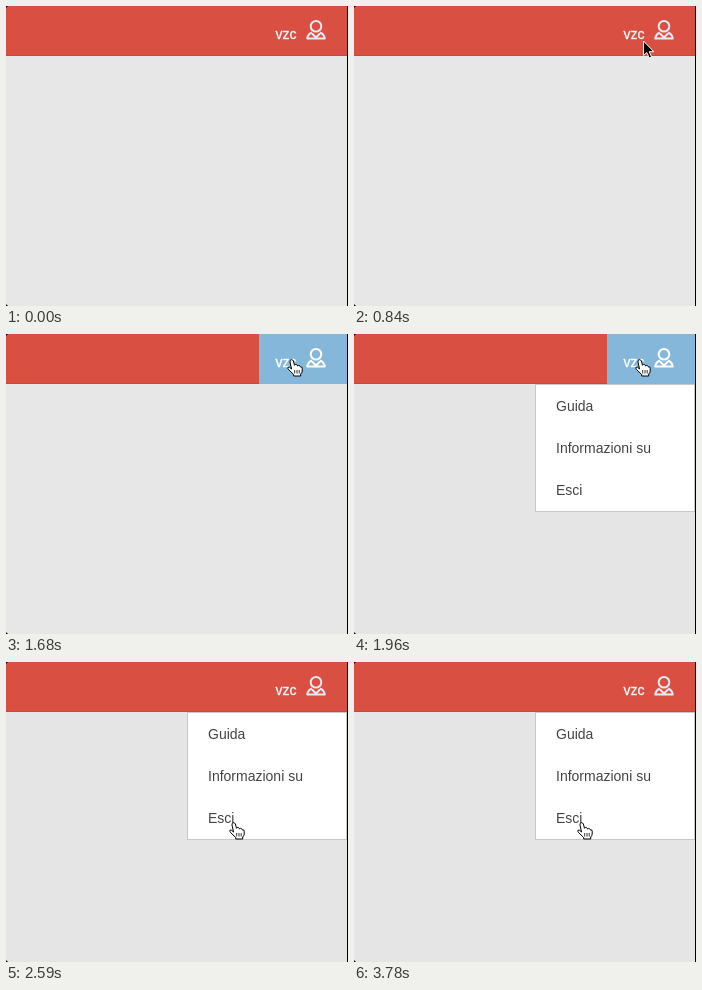
Recreate the animation shown at these times as an HTML page. Size 342x300 px, loop 3.85 s.

```html
<!DOCTYPE html>
<html lang="it">
<head>
<meta charset="utf-8">
<style>
  html, body { margin: 0; width: 100%; height: 100%; overflow: hidden; }
  svg { display: block; width: 342px; height: 300px; font: 14px "Liberation Sans", Arial, sans-serif; }
  #user { stroke-width: .35; }
  #icon { fill: none; stroke-width: 2; stroke-linejoin: round; }
  #menu text { fill: #444; }
  #arrow { fill: #000; stroke: #fff; }
  #hand { fill: #fff; stroke: #000; stroke-linejoin: round; }
</style>
</head>
<body>
<svg viewBox="0 0 342 300">
  <rect id="page" width="342" height="300"/>
  <rect width="342" height="50" fill="#d95043"/>
  <rect y="49" width="342" height="1" fill="#c4483c"/>
  <rect id="hover" x="253" width="88" height="50" fill="#84b7d9"/>
  <g id="account">
    <text id="user" x="269.5" y="33">vzc</text>
    <g id="icon">
      <circle cx="310" cy="20.3" r="5.3"/>
      <path d="M306 26.5Q302 28 301.2 32.5H318.8Q318 28 314 26.5M306 27.5L310 31.5L314 27.5"/>
    </g>
  </g>
  <g id="menu">
    <rect x="181.5" y="50.5" width="159" height="127" fill="#fff" stroke="#c8c8c8"/>
    <text x="202" y="77">Guida</text>
    <text x="202" y="119">Informazioni su</text>
    <text x="202" y="161">Esci</text>
  </g>
  <path d="M341 0h1v300h-1zM0 0h2l-2 2zM0 300v-2l2 2z"/>
  <g id="cursor">
    <path id="arrow" d="M.5 0V14.5L3.8 11.5L6.2 17L8.6 16L6.3 10.7H10.8Z"/>
    <g id="hand">
      <path d="M-.5 10L-2 3Q-2.2 1 -.8 .7T1.4 2L2.5 6.3Q3.2 5 4.3 5.5T5.6 7Q6.4 6 7.4 6.6T8.4 8Q10.2 7.3 10.2 9.2V12Q10 14 8.7 15V17H1.7V15.5L-3.2 10.8Q-4.8 9 -4 8.2Q-2.5 7.4 -.5 10Z"/>
      <path d="M2.7 11v3.5M5 11v3.5M7.2 11v3.5" stroke-width=".8"/>
    </g>
  </g>
</svg>
<script>
const LOOP = 3850, STEP = 70;
const path = [ // time, x, y of the pointer tip
  [70, 264, 266], [140, 309, 102], [420, 312, 98], [560, 317, 80], [700, 304, 52],
  [840, 289, 35], [910, 289, 34], [980, 288, 32], [1400, 286, 25], [2030, 286, 25],
  [2100, 281, 48], [2240, 263, 78], [2380, 246, 114], [2590, 228, 160]
];
const $ = id => document.getElementById(id);
const ramp = (t, from, to) => Math.min(1, Math.max(0, (t - from) / (to - from)));

function pointerAt(t) {
  const next = path.findIndex(p => p[0] > t);
  if (next < 0) return path[path.length - 1].slice(1);
  if (next === 0) return path[0].slice(1);
  const a = path[next - 1], b = path[next], k = ramp(t, a[0], b[0]);
  return [a[1] + (b[1] - a[1]) * k, a[2] + (b[2] - a[2]) * k];
}

function show(id, visible) {
  $(id).style.display = visible ? "" : "none";
}

function draw(now) {
  const t = Math.floor(now % LOOP / STEP) * STEP;
  const hover = ramp(t, 910, 1190) * (1 - ramp(t, 2030, 2240));
  const tint = hover > .5 ? "#fff" : "#e4eaf2";

  $("page").setAttribute("fill", t < 1820 ? "#e7e7e7" : "#e5e5e5");
  $("hover").setAttribute("opacity", hover);
  $("user").setAttribute("fill", "#fff");
  $("user").setAttribute("stroke", tint);
  $("icon").setAttribute("stroke", tint);
  $("menu").setAttribute("opacity", ramp(t, 1750, 1960));
  $("cursor").setAttribute("transform", `translate(${pointerAt(t).map(Math.round)})`);
  show("cursor", t >= 70);
  show("arrow", t < 980);
  show("hand", t >= 980);
  requestAnimationFrame(() => draw(performance.now()));
}
draw(0);
</script>
</body>
</html>
```
